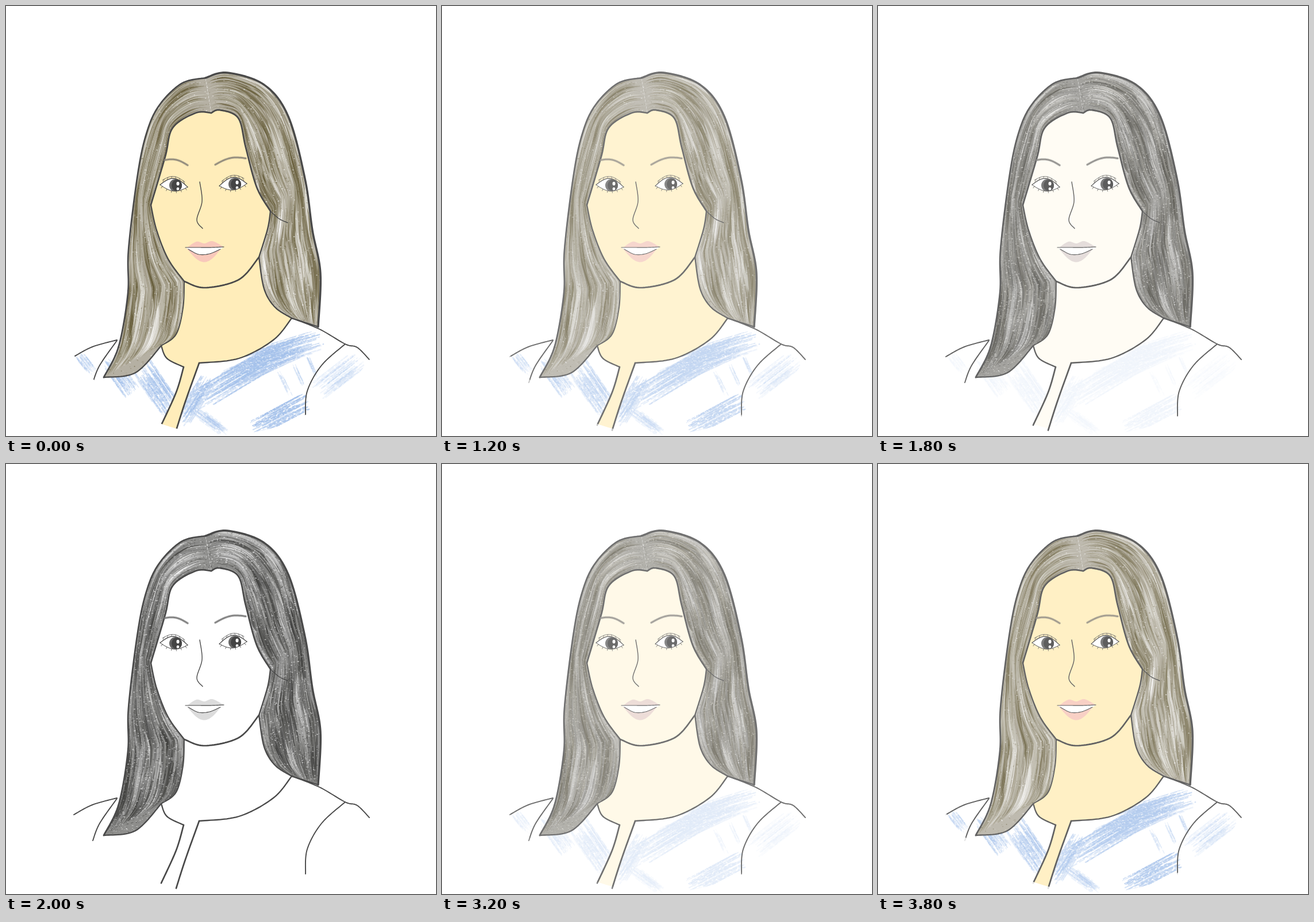
These frames come from a looping animation (748x748 px, 4 s). An HTML page with a canvas:

```html
<!DOCTYPE html>
<html lang="en">
<head>
<meta charset="utf-8">
<title>Portrait</title>
<style>
  html, body { margin: 0; width: 100%; height: 100%; overflow: hidden; background: #fff; }
  canvas { position: absolute; left: 0; top: 0; width: 748px; height: 748px; }
</style>
</head>
<body>
<canvas id="sketch" width="748" height="748"></canvas>
<canvas id="paint" width="748" height="748"></canvas>
<script>
const INK = '#494949';

function seeded(seed) {
  return () => {
    seed = (seed + 0x6D2B79F5) | 0;
    let t = Math.imul(seed ^ (seed >>> 15), 1 | seed);
    t = (t + Math.imul(t ^ (t >>> 7), 61 | t)) ^ t;
    return ((t ^ (t >>> 14)) >>> 0) / 4294967296;
  };
}

const mix = (a, b, t) => a.map((v, i) => v + (b[i] - v) * t);
const rev = pts => [...pts].reverse();

// Catmull-Rom curve through "x,y x,y ..." as a dense list of points
function curve(text, n = 14) {
  const p = text.split(' ').map(s => s.split(',').map(Number));
  const at = i => p[Math.max(0, Math.min(p.length - 1, i))];
  const out = [];
  for (let i = 0; i < p.length - 1; i++) {
    const [a, b, c, d] = [at(i - 1), at(i), at(i + 1), at(i + 2)];
    for (let k = 0; k < n; k++) {
      const t = k / n;
      out.push([0, 1].map(j => b[j] + 0.5 * t * (c[j] - a[j] +
        t * (2 * a[j] - 5 * b[j] + 4 * c[j] - d[j] + t * (3 * (b[j] - c[j]) + d[j] - a[j])))));
    }
  }
  out.push(at(p.length - 1));
  return out;
}

// Shallow arch from a to b; a positive rise bends upwards
function arch(a, b, rise, n = 24) {
  return Array.from({ length: n + 1 }, (_, i) => {
    const [x, y] = mix(a, b, i / n);
    return [x, y - rise * Math.sin(Math.PI * i / n)];
  });
}

// Same line as evenly spaced points
function resample(pts, n) {
  const dist = [0];
  for (let i = 1; i < pts.length; i++) {
    dist.push(dist[i - 1] + Math.hypot(pts[i][0] - pts[i - 1][0], pts[i][1] - pts[i - 1][1]));
  }
  let i = 1;
  return Array.from({ length: n + 1 }, (_, k) => {
    const d = dist.at(-1) * k / n;
    while (i < pts.length - 1 && dist[i] < d) i++;
    return mix(pts[i - 1], pts[i], (d - dist[i - 1]) / (dist[i] - dist[i - 1] || 1));
  });
}

function toPath(pts, closed) {
  const path = new Path2D();
  pts.forEach(([x, y]) => path.lineTo(x, y));
  if (closed) path.closePath();
  return path;
}

const shape = (...parts) => toPath(parts.flat(), true);

const outL = curve('347,125 305,135 265,175 243,226 228,300 213,425 212,500 196,592 170,646');
const outR = curve('347,125 385,116 449,137 491,192 520,300 533,390 547,465 543,558');
const tip = curve('170,646 225,638 270,591');
const hem = curve('543,558 497,543');
const hairL = curve('357,186 330,186 290,212 277,262 252,346');
const hairR = curve('357,186 372,181 404,195 417,246 436,315 460,357');
const jaw = curve('252,346 262,390 282,440 310,479');
const chin = curve('310,479 346,490 405,476 440,437');
const cheek = curve('460,357 455,388 440,437');
const neckL = curve('310,479 308,525 296,571 270,591');
const neckR = curve('440,437 449,492 468,524 497,543');
const collarL = curve('270,591 280,613 309,628');
const collarR = curve('497,543 465,581 405,613 336,621');
const placketL = curve('309,628 296,672 270,729');
const placketR = curve('336,621 312,688 296,738');
const shoulderL = curve('118,610 150,593 193,581');
const shoulderR = curve('497,543 545,562 590,588 611,594 632,615');
const armL = curve('193,582 163,625 151,655');
const armR = curve('590,588 549,625 524,670 521,713');
const nose = curve('337,306 341,340 332,372 342,387');
const wisp = curve('460,357 475,370 490,377');

const face = shape(hairR, cheek, rev(chin), rev(jaw), rev(hairL));
const neck = shape(neckL, collarL, placketL, rev(placketR), rev(collarR), rev(neckR), rev(chin));
const shirt = shape(shoulderL, rev(neckL).slice(0, 1), collarL, rev(collarR), shoulderR,
  [[632, 748], [118, 748]]);

const SPAN = 80;
const lock = (outer, base, inner) => ({
  area: shape(outer, base, rev(inner)),
  outer: resample(outer, SPAN),
  inner: resample(inner, SPAN)
});
const locks = [
  lock(outL, tip, [...hairL, ...jaw, ...neckL]),
  lock(outR, hem, [...hairR, ...cheek, ...neckR])
];

const lineGroups = [
  [3.4, [outR]],
  [2.7, [outL, hairL, hairR, chin, placketL, placketR]],
  [2.3, [tip, hem, jaw, cheek, neckR, collarL, collarR]],
  [1.9, [neckL, shoulderL, shoulderR, armL, armR]],
  [1.4, [nose, wisp]]
];

function stroke(g, pts, width, color = INK, alpha = 1) {
  g.globalAlpha = alpha;
  g.strokeStyle = color;
  g.lineWidth = width;
  g.stroke(toPath(pts));
  g.globalAlpha = 1;
}

function fill(g, path, color) {
  g.fillStyle = color;
  g.fill(path);
}

function dot(g, x, y, rx, ry, color) {
  g.beginPath();
  g.ellipse(x, y, rx, ry, 0, 0, 7);
  g.fillStyle = color;
  g.fill();
}

function clipped(g, path, draw) {
  g.save();
  g.clip(path);
  draw();
  g.restore();
}

// Tapered brush marks along the flow; waves group light and dark ones
function strands(g, rnd, { outer, inner }, { dark, light, count }) {
  for (let i = 0; i < count; i++) {
    const s = rnd(), from = Math.floor(rnd() * (SPAN - 4));
    const to = Math.min(SPAN, from + 6 + Math.floor(rnd() * 12));
    const thick = 0.008 + 0.045 * rnd() ** 2, drift = (rnd() - 0.5) * 0.06;
    const t = from / SPAN, near = [], far = [];
    for (let k = from; k <= to; k++) {
      const u = (k - from) / (to - from), m = s + drift * u;
      near.push(mix(outer[k], inner[k], m));
      far.push(mix(outer[k], inner[k], m + thick * Math.sin(Math.PI * u)));
    }
    const wave = 0.14 * Math.sin(19 * s + 4 * t) + 0.12 * Math.sin(15 * t - 9 * s);
    const tone = Math.max(0, Math.min(1, light(t) + wave + (rnd() - 0.5) * 0.75));
    g.globalAlpha = 0.45 + 0.45 * rnd();
    fill(g, shape(near, rev(far)), `rgb(${mix(dark, [255, 255, 255], tone).map(Math.round)})`);
  }
  g.globalAlpha = 1;
}

function grain(g, rnd, count, [x, y, w, h], color, alpha) {
  g.fillStyle = color;
  for (let i = 0; i < count; i++) {
    g.globalAlpha = alpha * rnd();
    g.fillRect(x + w * rnd(), y + h * rnd(), 0.8 + 2.2 * rnd(), 0.7 + rnd());
  }
  g.globalAlpha = 1;
}

function hair(g, rnd, style) {
  const box = [165, 112, 390, 540], dark = `rgb(${style.dark})`;
  for (const one of locks) {
    clipped(g, one.area, () => {
      fill(g, one.area, style.base);
      strands(g, rnd, one, style);
      grain(g, rnd, style.specks, box, '#fff', 0.7);
      grain(g, rnd, style.specks, box, dark, 0.6);
    });
  }
}

// Dry crayon band from a to b
function band(g, rnd, a, b, width, alpha) {
  const len = Math.hypot(b[0] - a[0], b[1] - a[1]);
  const nx = (a[1] - b[1]) / len, ny = (b[0] - a[0]) / len;
  for (let i = 0; i < width * 1.5; i++) {
    const off = (rnd() - 0.5) * width;
    const at = t => mix(a, b, t).map((v, j) => v + off * [nx, ny][j]);
    g.setLineDash([4 + 20 * rnd(), 2 + 4 * rnd()]);
    stroke(g, [at(rnd() * 0.4), at(0.65 + 0.35 * rnd())], 0.8 + 2 * rnd(), '#a3c0ea', alpha * (0.4 + 0.6 * rnd()));
  }
  g.setLineDash([]);
}

function plaid(g, rnd) {
  for (let i = 0; i < 3; i++) {
    band(g, rnd, [330 + 45 * i, 690 - 35 * i], [480 + 35 * i, 600 - 10 * i], 38, 0.6);
    band(g, rnd, [122 + 54 * i, 604 + 8 * i], [150 + 70 * i, 640 + 34 * i], 22 + 9 * i, 0.4 + 0.15 * i);
    band(g, rnd, [474 + 26 * i, 634 - 12 * i], [496 + 22 * i, 680 - 18 * i], 6, 0.35);
  }
  band(g, rnd, [302, 728], [355, 645], 28, 0.6);
  band(g, rnd, [325, 702], [385, 746], 20, 0.4);
  band(g, rnd, [428, 738], [526, 686], 30, 0.85);
  band(g, rnd, [540, 672], [618, 612], 36, 0.25);
}

function eye(g, x, y, tilt) {
  const left = [x - 24, y + tilt], right = [x + 24, y - tilt];
  const upper = arch(left, right, 13), lower = arch(left, right, -9);
  const crease = arch([x - 20, y - 8 + tilt], [x + 19, y - 9 - tilt], 8);
  const ball = shape(upper, rev(lower));
  fill(g, ball, '#fff');
  clipped(g, ball, () => {
    dot(g, x + 3, y - 1, 11, 11, '#666');
    dot(g, x + 5, y - 1, 9, 10, '#444');
    dot(g, x + 7, y - 4, 2.5, 3.3, '#fff');
    dot(g, x + 7, y + 5, 2.3, 2.6, '#fff');
  });
  stroke(g, upper, 1.3);
  stroke(g, lower, 1);
  stroke(g, crease, 0.8);
  for (let i = 2; i < 24; i += 4) {
    stroke(g, [crease[i], mix(crease[i], upper[i], 0.7)], 0.7);
    const [lx, ly] = lower[i];
    stroke(g, [[lx, ly], [lx + (i - 12) / 5, ly + 3]], 0.8);
  }
}

function features(g, browTone, lipTone) {
  for (const brow of [arch([276, 268], [316, 277], 5), arch([364, 276], [417, 265], 6)]) {
    stroke(g, brow, 4, browTone, 0.5);
    stroke(g, brow, 2, browTone, 0.9);
  }
  eye(g, 292, 313, -2);
  eye(g, 395, 311, 2);

  const bow = curve('314,421 331,410 345,413 359,409 377,418');
  const smile = curve('312,420 333,420 358,420 379,419'), teeth = curve('317,423 335,432 354,431 373,423');
  fill(g, shape(bow, arch([377, 418], [314, 421], -26)), lipTone);
  fill(g, shape(smile, rev(teeth)), '#fff');
  stroke(g, smile, 1.2);
  stroke(g, teeth, 1.1);
}

function outlines(g) {
  for (const [width, group] of lineGroups) group.forEach(pts => stroke(g, pts, width));
}

function context(id) {
  const g = document.getElementById(id).getContext('2d');
  g.lineCap = g.lineJoin = 'round';
  return g;
}

function drawSketch() {
  const g = context('sketch');
  hair(g, seeded(11), {
    base: '#8e8e8c', dark: [66, 66, 64], count: 1500, specks: 7000,
    light: t => 0.3 + 0.25 * Math.exp(-((t * 8) ** 2))
  });
  outlines(g);
  features(g, '#777', '#dcdcdc');
}

function drawPaint() {
  const g = context('paint'), rnd = seeded(5);
  const skin = '#ffedba', disc = new Path2D();
  disc.rect(0, 0, 748, 433);
  disc.arc(378, 433, 313, 0, Math.PI);
  clipped(g, disc, () => {
    clipped(g, shirt, () => {
      plaid(g, rnd);
      grain(g, rnd, 9000, [118, 540, 515, 208], '#fff', 0.8);
    });
    fill(g, neck, skin);
    fill(g, face, skin);
    hair(g, rnd, {
      base: '#b5b0a3', dark: [98, 88, 52], count: 1300, specks: 1800,
      light: t => 0.34 + 0.16 * t
    });
    outlines(g);
    features(g, '#8a8478', '#f8c8bb');
  });
}

drawSketch();
drawPaint();

// Hold, fall by sixths every tick, hold, rise again
const TICKS = 20, TICK = 200;
const level = i => (i < TICKS / 2 ? Math.min(6, 10 - i) : Math.max(0, i - 14)) / 6;

function fade(id, opacityAt) {
  const frames = Array.from({ length: TICKS + 1 }, (_, i) =>
    ({ offset: i / TICKS, opacity: opacityAt(level(i)), easing: 'step-end' }));
  const run = document.getElementById(id).animate(frames, { duration: TICKS * TICK, iterations: Infinity });
  run.startTime = 0;
}

fade('paint', k => k);
fade('sketch', k => 1 - k);
</script>
</body>
</html>
```
